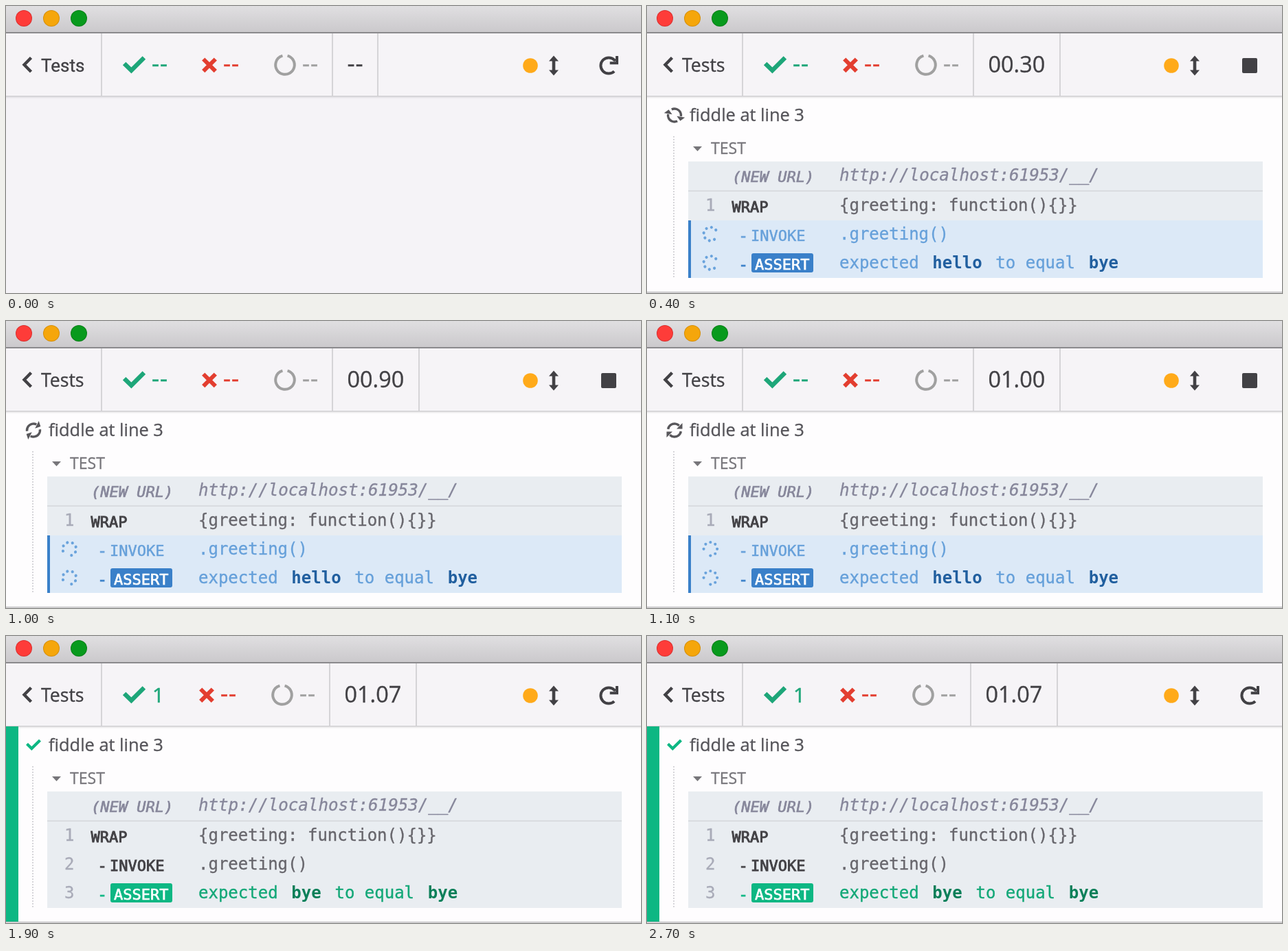
An HTML page with a canvas for the animation above (2.8 s loop, 924x419 px).

```html
<!DOCTYPE html>
<html lang="en">
<head>
<meta charset="utf-8">
<title>Test runner</title>
<style>
  html, body { margin: 0; width: 100%; height: 100%; overflow: hidden; }
  canvas { display: block; }
</style>
</head>
<body>
<canvas id="stage" width="924" height="419"></canvas>
<script>
const ctx = document.getElementById('stage').getContext('2d');
const LOOP = 2800, STEP = 100, START = 100, DONE = 1200;
const SANS = '"Open Sans", sans-serif', MONO = '"DejaVu Sans Mono", monospace';
const DARK = '#424145', GREY = '#a0a0a0', GREEN = '#1ea679', RED = '#e33e30';
const BLUE = '#3a80c9', PASS = '#0db783', RULE = '#d5d4d7';

function rect(x, y, w, h, color, radius = 0) {
  ctx.fillStyle = color;
  ctx.beginPath();
  ctx.roundRect(x, y, w, h, radius);
  ctx.fill();
}

function dot(x, y, r, color) {
  ctx.fillStyle = color;
  ctx.beginPath();
  ctx.arc(x, y, r, 0, 2 * Math.PI);
  ctx.fill();
}

function ring(x, y, r, from, to, width, color) {
  ctx.strokeStyle = color;
  ctx.lineWidth = width;
  ctx.beginPath();
  ctx.arc(x, y, r, from * Math.PI / 180, to * Math.PI / 180);
  ctx.stroke();
}

function trace(points) {
  ctx.beginPath();
  for (const [x, y] of points) ctx.lineTo(x, y);
}

function line(points, width, color) {
  trace(points);
  ctx.strokeStyle = color;
  ctx.lineWidth = width;
  ctx.stroke();
}

function shape(points, color) {
  trace(points);
  ctx.fillStyle = color;
  ctx.fill();
}

// Returns the x position after the text; weight thickens the glyphs.
function text(str, x, y, font, color, weight = 0.35) {
  ctx.font = font;
  ctx.fillStyle = color;
  ctx.fillText(str, x, y);
  if (weight) {
    ctx.strokeStyle = color;
    ctx.lineWidth = weight;
    ctx.strokeText(str, x, y);
  }
  return x + ctx.measureText(str).width;
}

const dashes = (x, color) => text('--', x, 96.5, '32.5px Lato, sans-serif', color, 0.7);

function at(x, y, angle, scale, draw) {
  ctx.save();
  ctx.translate(x, y);
  ctx.rotate(angle);
  ctx.scale(scale, scale);
  draw();
  ctx.restore();
}

function check(x, y, scale, color) {
  at(x, y, 0, scale, () => line([[-14.4, -2.1], [-4.1, 8.1], [14.4, -10.4]], 6.4, color));
}

function syncIcon(x, y, angle) {
  for (const half of [0, Math.PI]) {
    at(x, y, angle + half, 1, () => {
      ring(0, 0, 9.5, 190, 315, 3.4, '#58575b');
      shape([[11.5, -10.4], [11.5, -2], [3, -2]], '#58575b');
    });
  }
}

function spinner(x, y, angle) {
  at(x, y, angle, 1, () => {
    for (let i = 0; i < 7; i++) {
      const a = i * Math.PI / 4;
      dot(9.8 * Math.cos(a), 9.8 * Math.sin(a), 2.1, '#6aa3dc');
    }
  });
}

function redoIcon() {
  ring(877, 87, 11.6, 46, 325, 4, DARK);
  line([[889, 73], [889, 83.3], [878.7, 83.3]], 4, DARK);
}

function titleBar() {
  const shade = ctx.createLinearGradient(0, 0, 0, 38);
  shade.addColorStop(0, '#e0dfe1');
  shade.addColorStop(1, '#cbc9cc');
  rect(0, 0, 924, 38, shade);
  rect(0, 38, 924, 2, '#8b8a8d');
  [['#fe3c39', '#d9302f'], ['#f5a60b', '#d68e08'], ['#089a1d', '#087f18']].forEach(([fill, edge], i) => {
    dot(26 + 40 * i, 18, 12, edge);
    dot(26 + 40 * i, 18, 11, fill);
  });
}

function toolBar(t, idle, done) {
  const shift = done ? -4 : 0;
  rect(0, 40, 924, 92, '#f6f4f7');
  rect(0, 131, 924, 1.5, '#cfced1');
  rect(0, 132.5, 924, 2, 'rgba(0,0,0,.06)');
  for (const x of [138, 474 + shift, idle ? 540 : 600 + shift]) rect(x, 40, 2, 91, RULE);

  line([[36.5, 75.5], [26.5, 85.8], [36.5, 96]], 4.4, DARK);
  text('Tests', 51, 96, idle ? '26px Roboto, sans-serif' : '26.6px ' + SANS, DARK);

  check(186.5, 86, 1, GREEN);
  if (done) text('1', 213, 97, '30px ' + SANS, GREEN, 0.6);
  else dashes(211.5, GREEN);

  at(296 + shift, 86.3, 0, 1, () => {
    line([[-8.8, -8.8], [8.8, 8.8]], 6, RED);
    line([[8.8, -8.8], [-8.8, 8.8]], 6, RED);
  });
  dashes(315.5 + shift, RED);

  ring(406 + shift, 86, 13.8, -75, 255, 4, GREY);
  dashes(430.5 + shift, GREY);

  if (idle) {
    dashes(496, DARK);
  } else {
    const seconds = done ? 1.07 : (t - START) / 1000;
    text(seconds.toFixed(2).padStart(5, '0'), 496.5 + shift, 97, '32.4px ' + SANS, DARK);
  }

  dot(763, 87, 10.8, '#ffaa1a');
  rect(794.7, 78, 4.6, 18, DARK);
  shape([[797, 72.5], [804, 80.5], [790, 80.5]], DARK);
  shape([[797, 101.5], [804, 93.5], [790, 93.5]], DARK);
  if (idle || done) redoIcon();
  else rect(866, 76, 22, 22, DARK, 2);
}

function assertion(done) {
  const plain = done ? '#14a878' : '#66a0da', strong = done ? '#0b7f59' : '#215f9f';
  const actual = done ? 'bye' : 'hello';
  let x = 280;
  for (const part of ['expected ', actual, ' to equal ', 'bye']) {
    const bold = part === actual || part === 'bye', pad = bold ? 5.3 : 0;
    const font = (bold ? 'bold ' : '') + '24px ' + MONO;
    x = text(part, x + pad, 383, font, bold ? strong : plain, bold ? 0 : 0.4) + pad;
  }
}

function commandLog(t, done) {
  const angle = (t - START) / 2000 * 2 * Math.PI;
  const code = '24px ' + MONO, name = '22px ' + MONO;
  const muted = '#86869a', number = '#a9abb8';

  if (done) {
    rect(0, 132, 18, 285, PASS);
    check(40, 159, 0.66, PASS);
  } else {
    syncIcon(40, 159.5, angle);
  }
  text('fiddle at line 3', 62, 168, '25.4px ' + SANS, '#56555a');

  ctx.setLineDash([2, 2]);
  line([[39, 190], [39, 397]], 2, '#d6d5d9');
  ctx.setLineDash([]);
  shape([[67, 205], [80, 205], [73.5, 212]], '#77767a');
  text('TEST', 93, 216, '23px ' + SANS, '#77767b');

  rect(60, 227, 836, 170, '#e9edf1');
  rect(60, 269, 836, 2, '#d9dce0');
  text('(NEW URL)', 124, 257, 'italic ' + name, muted, 0.7);
  text('http://localhost:61953/__/', 280, 255, 'italic 24.15px ' + MONO, muted);
  text('1', 85, 299, code, number);
  text('WRAP', 123.5, 301, name, DARK, 0.9);
  text('{greeting: function(){}}', 280, 299, code, '#67666c');

  if (done) {
    text('2', 85, 341, code, number);
    text('3', 85, 383, code, number);
  } else {
    rect(60, 313, 836, 84, '#dce9f7');
    rect(60, 313, 4, 84, BLUE);
    spinner(92.3, 332.8, angle);
    spinner(92.3, 374.8, angle);
  }
  const invoke = done ? DARK : '#66a0da', badge = done ? PASS : BLUE;
  text('-', 133.5, 343, name, invoke, 1);
  text('INVOKE', 151, 343, name, invoke, done ? 0.9 : 0.5);
  text('.greeting()', 280, 341, code, done ? '#67666c' : '#66a0da');
  text('-', 133.5, 385, name, badge, 1);
  rect(152, 361, 90, 28, badge, 3);
  text('ASSERT', 157, 385, name, '#fff', 0.7);
  assertion(done);

  rect(0, 417, 924, 1.5, '#bdbcbf');
}

function frame() {
  const t = Math.floor(performance.now() % LOOP / STEP) * STEP;
  const idle = t < START, done = t >= DONE;
  rect(0, 0, 924, 419, idle ? '#f5f3f7' : '#fefdfe');
  titleBar();
  toolBar(t, idle, done);
  if (!idle) commandLog(t, done);
  requestAnimationFrame(frame);
}
frame();
</script>
</body>
</html>
```
